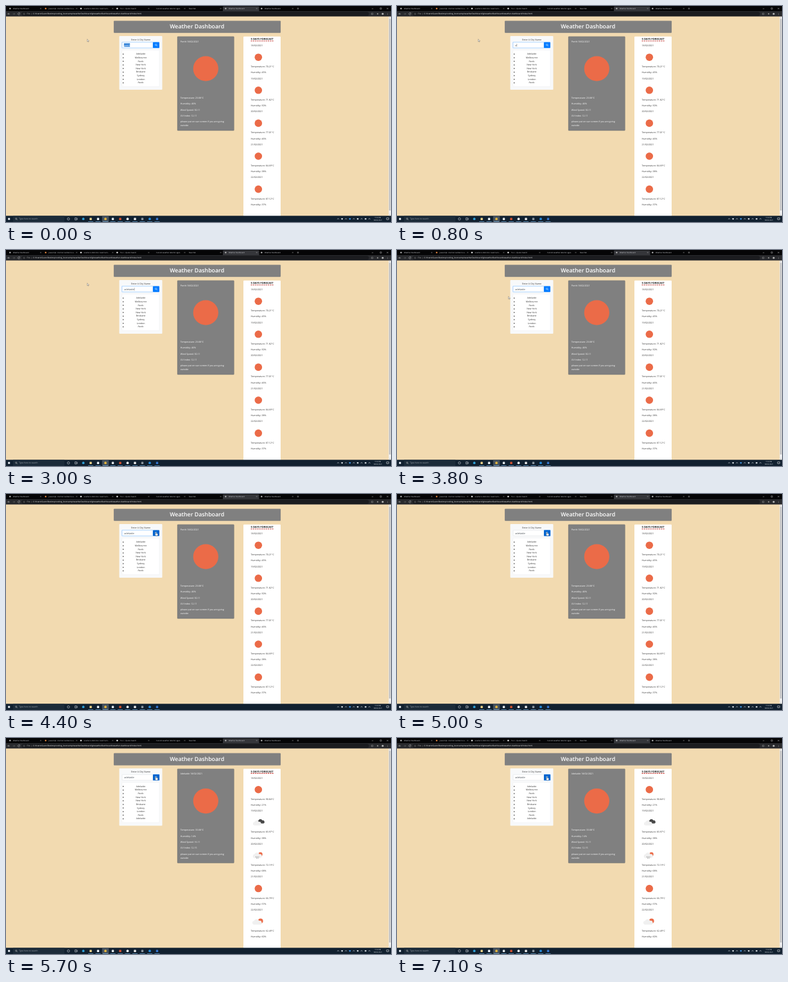
An HTML page that plays this animation: 600 px wide and 338 px high, repeating every 8000 ms.

```html
<!DOCTYPE html>
<html lang="en">
<head>
<meta charset="utf-8">
<title>Weather Dashboard</title>
<style>
html, body { margin: 0; width: 100%; height: 100%; overflow: hidden; background: #f2dab0; }
svg { display: block; width: 600px; height: 338px; }
text { font-family: "Open Sans", "Noto Sans", sans-serif; text-rendering: geometricPrecision; white-space: pre; }
</style>
</head>
<body>
<svg viewBox="0 0 600 338"><g id="page"></g><g id="frame"></g><g id="pointer"></g></svg>
<script>
const LOOP = 8000, ORANGE = '#eb6b48', REM = 3.75;
const range = n => [...Array(n).keys()];

// y is the vertical middle of the text
const text = (x, y, s, fill = '#333', size = 3.57, extra = '') =>
  `<text x="${x}" y="${y + size * .36}" font-size="${size}" fill="${fill}" ${extra}>${s}</text>`;
const mid = (x, y, s, fill, size, extra = '') => text(x, y, s, fill, size, 'text-anchor="middle" ' + extra);
const rect = (x, y, w, h, fill, rx = 0, extra = '') =>
  `<rect x="${x}" y="${y}" width="${w}" height="${h}" fill="${fill}" rx="${rx}" ${extra}/>`;
const dot = (x, y, r, fill) => `<circle cx="${x}" cy="${y}" r="${r}" fill="${fill}"/>`;
const line = (d, stroke, w = .5, extra = '') =>
  `<path d="${d}" fill="none" stroke="${stroke}" stroke-width="${w}" ${extra}/>`;
const lens = (x, y, r, stroke) =>
  line(`M${x - r} ${y}a${r} ${r} 0 1 1 ${2 * r} 0a${r} ${r} 0 1 1 ${-2 * r} 0M${x + r * .7} ${y + r * .7}l1.2 1.2`, stroke);
const cloud = (x, y, k, fill) =>
  `<path transform="translate(${x} ${y}) scale(${k})" fill="${fill}" d="M-4.5 3a2.6 2.6 0 0 1 .3-5.1a3.8 3.8 0 0 1 7-.3a2.8 2.8 0 0 1 1.5 5.4z"/>`;

const icons = {
  sun: (x, y) => dot(x, y, 5.8, ORANGE),
  clouds: (x, y) => cloud(x + 3.8, y - 1.2, .9, '#484848') + cloud(x - 2, y + 1.3, 1, '#f0f0f0'),
  partly: (x, y) => dot(x + 3.4, y - .8, 3.9, ORANGE) + cloud(x - 2, y + 1.5, 1.15, '#f0f0f0'),
  rain: (x, y) => dot(x + 3.2, y - 2, 3.2, ORANGE) + cloud(x - 1.6, y + .4, 1.1, '#f0f0f0') +
    range(5).map(i => dot(x - 3.8 + i * 1.1, y + 2 + (i % 2) * 2, .55, '#555')).join('')
};

const cities = ['Adelaide', 'Melbourne', 'Perth', 'New York', 'New York', 'Brisbane', 'Sydney', 'London', 'Perth'];
const forecasts = [
  { temp: ['70.21', '71.82', '77.01', '84.69', '87.12'], hum: [45, 50, 46, 38, 37], sky: Array(5).fill('sun') },
  { temp: ['90.84', '83.97', '72.19', '66.79', '62.49'], hum: [21, 38, 68, 57, 60],
    sky: ['sun', 'clouds', 'rain', 'sun', 'partly'] }
];
const keyTimes = [800, 1300, 1500, 1800, 2000, 2300, 2500, 2700];

function searchCard(t, hover) {
  const list = t < 5300 ? cities : [...cities, 'Adelaide'];
  const grow = (list.length - 9) * REM * 1.5;
  const focus = t < 4700;
  const typed = 'adelaide'.slice(0, keyTimes.filter(k => t >= k).length);
  const widths = { a: .556, d: .613, e: .561, l: .253, i: .253 };
  const caret = 184.2 + [...typed].reduce((w, c) => w + widths[c] * 3.9, 0);
  return rect(176.5, 47, 67, 84 + grow, '#f8f9fa', 1) +
    mid(210, 52.5, 'Enter A City Name') +
    (focus ? rect(180.2, 55.9, 49.4, 10.4, '#bfdeff', 1.2) : rect(228.6, 55.9, 11, 10.4, '#a9cffb', 1.2)) +
    rect(181, 56.7, 47.8, 8.8, '#fff', .8, `stroke="${focus ? '#80bdff' : '#ced4da'}" stroke-width=".35"`) +
    (t < 600
      ? rect(183.8, 58.4, 9.4, 5.4, '#2f80d8') + text(184.2, 61.2, 'perth', '#fff', 3.9)
      : text(184.2, 61.2, typed, '#495057', 3.9)) +
    (t >= 600 && t < 3200 ? line(`M${caret + .4} 59v4.6`, '#333', .35) : '') +
    rect(229, 56.5, 10, 9.2, hover ? '#0064cf' : '#007bff', .8) + lens(233.7, 60.8, 1.3, '#fff') +
    rect(180.8, 69, 58.2, 57 + grow, '#fff', .8, 'stroke="#e4e5e6" stroke-width=".3"') +
    list.map((c, i) => {
      const y = 75 + i * REM * 1.5;
      return dot(182.6, y + .3, .75, '#222') + mid(210, y, c);
    }).join('');
}

function todayCard(t) {
  const fresh = t >= 5300, uv = !fresh || t >= 5600;
  const rows = fresh
    ? ['Temperature: 33.88°C', 'Humidity: 14%', 'Wind Speed: 16.11']
    : ['Temperature: 23.88°C', 'Humidity: 46%', 'Wind Speed: 30.11'];
  if (uv) rows.push(`UV Index: ${fresh ? 12.15 : 12.11}`, 'please put on sun screen if you are going');
  return rect(267, 47.7, 88.4, uv ? 147.4 : 123.1, '#808080', 1, 'stroke="#6f6c66" stroke-width=".3"') +
    text(271.8, 55.6, `${fresh ? 'Adelaide' : 'Perth'} 18/02/2021`, '#fff') +
    dot(311.3, 98, 19.6, ORANGE) +
    rows.map((s, i) => text(271.8, 143.5 + i * REM * 2.5, s, '#fff')).join('') +
    (uv ? text(271.8, 186.7, 'outside', '#fff') : '');
}

function forecastCard(t) {
  const f = forecasts[t < 5600 ? 0 : 1];
  return rect(370, 47.7, 58, 290, '#fff', 1) +
    text(381.5, 52, '5 DAYS FORECAST', '#222', 4.08, 'font-weight="700"') +
    line('M381.5 54.8h35.6', '#c23a34', 1.1, 'stroke-dasharray="2.2 1.1"') +
    range(5).map(i => {
      const y = i * 51.6;
      return text(381.5, 61.8 + y, `${18 + i}/02/2021`) + icons[f.sky[i]](393.3, 80.2 + y) +
        text(381.5, 94.9 + y, `Temperature: ${f.temp[i]}°C`) +
        text(381.5, 104.2 + y, `Humidity: ${f.hum[i]}%`);
    }).join('');
}

function pointerAt(t) {
  if (t >= 4400) return [233.8, t < 5600 ? 59.6 : t < 6600 ? 60.2 : t < 7000 ? 60.6 : 60.4];
  const u = Math.min(1, Math.max(0, Math.floor((t - 3400) / 100) / 9));
  const e = u * u * (3 - 2 * u), v = 1 - e;
  const bend = (a, b, c) => v * v * a + 2 * v * e * b + e * e * c;
  return [bend(126.6, 185, 233.8), bend(51.8, 92, 59.6)];
}

function pointer(x, y, hand) {
  const d = hand
    ? 'M-.5 .4q.5-.8 1 0v1.7l2 .5q.5.2.4.9l-.5 2.2h-2.7l-1.7-2.3q.2-.8 1.5 0z'
    : 'M0 0v4l1-.9.6 1.4.6-.3-.6-1.3h1.2z';
  return `<path transform="translate(${x} ${y})" d="${d}" fill="#fff" stroke="#222" stroke-width=".3"/>`;
}

function browserBar() {
  const tabs = [[11, 'Weather Dashboard', '#aaa'], [66.5, 'javascript - Format number to a...', '#d9803c'],
    [121.5, 'ai what is distri do i need num -', '#ddd'], [178, 'f to c - Quolvi Search', '#ddd'],
    [234, 'Current weather data for ageo'], [285, 'New Tab'],
    [347, 'Weather Dashboard', '#aaa'], [403, 'Weather Dashboard', '#aaa']];
  return rect(0, 0, 600, 8.2, '#050506') + rect(338, .8, 56.5, 7.6, '#35363a', 1.2) +
    rect(0, 8, 600, 8.4, '#292a2d') + rect(24.5, 8.9, 541, 6.6, '#1b1c1f', 3.3) +
    tabs.map(([x, s, c], i) => text(x, 4, s, '#dadce0', 2.65) +
      (c ? dot(x - 4.7, 4, 1.25, c) : '') +
      line(`M${53.3 + 56.1 * i} 3.2l1.6 1.6m0-1.6l-1.6 1.6`, '#ccc', .35)).join('') +
    line('M453.5 4h3M455 2.5v3M570 4.2h2.4M583 2.9h2.2v2.2h-2.2zM593.4 2.9l2.3 2.3m0-2.3l-2.3 2.3', '#ddd', .4) +
    line('M6 12.3h-3.2m1.4-1.4l-1.4 1.4 1.4 1.4', '#ddd', .45) +
    line('M10.5 12.3h3.2m-1.4-1.4l1.4 1.4-1.4 1.4', '#777', .45) +
    line('M21.4 11.4a1.6 1.6 0 1 0 .2 1.5M21.6 10.6v1.1h-1.1', '#ddd', .45) +
    line('M27 12.3a1.2 1.2 0 1 1 2.4 0a1.2 1.2 0 1 1-2.4 0M28.2 12v.8M39.8 10.8v3', '#aaa', .3) +
    text(32.5, 12.3, 'File', '#bbb', 3.1) +
    text(42, 12.3, 'C:/Users/Guest/Desktop/coding_bootcamp/weatherDashboard/gitweatherDashboard/weather-dashboard/index.html', '#eee', 3.1) +
    line('M569.5 11.2h2.4v2.2h-2.4z', '#bbb', .4) + dot(579.2, 12.3, 1.1, '#999') +
    dot(587, 12.3, 1.5, '#b8b8b8') + range(3).map(i => dot(594.8, 11.2 + i * 1.1, .32, '#ddd')).join('');
}

function taskbar() {
  const apps = [[120.5, '#2f9fd6'], [132, '#efd58a'], [143.5, '#e8eef2'], [155, '#e5b63c'], [166.5, '#dfe5e8'],
    [178, '#d2512f'], [189.5, '#f2f2f2'], [201, '#e9e9e9'], [212.5, '#89939c'], [224, '#2689d8'], [235.5, '#3474cc']];
  return rect(0, 328.3, 600, 9.7, '#11202f') + rect(11, 328.5, 80, 9.5, '#1c2b39') +
    rect(3.2, 331.7, 3, 3, '#e8eef4') + lens(15.8, 332.9, 1.1, '#ccc') +
    text(20.3, 333.3, 'Type here to search', '#aab1b8', 3.2) +
    line('M95.5 333.2a1.8 1.8 0 1 1 3.6 0a1.8 1.8 0 1 1-3.6 0M107.4 331.6h2.6v3.2h-2.6zM111 331.6v3.2', '#e5e9ec', .55) +
    rect(149.8, 328.4, 10.4, 9.6, '#46525e') +
    apps.map(([x, c], i) => (i % 3 ? rect(x - 1.7, 331.5, 3.4, 3.4, c, .4) : dot(x, 333.2, 1.9, c)) +
      (i > 0 ? rect(x - 4, 337.3, 8, .6, '#76b9ed') : '')).join('') +
    range(9).map(i => i % 2
      ? rect(516.4 + i * 6.1, 332, 2.5, 2.3, i === 3 ? '#3f91dc' : '#ccd2d8', .5)
      : line(`M${516.2 + i * 6.1} 334l1.4-1.8 1.4 1.8`, '#e2e6ea', .5)).join('') +
    mid(579.3, 331.2, '7:19 PM', '#e8ebee', 2.6) + mid(579.3, 335.2, '18/02/2021', '#e8ebee', 2.6) +
    line('M593 331.6h3.6v2.6h-1.5l-.8.8v-.8h-1.3z', '#fff', .5);
}

function scrollbar() {
  return rect(596.4, 16.4, 3.6, 312, '#f1f1f1') + rect(596.9, 20, 2.6, 300, '#c4c4c4') +
    line('M597.4 18.7l.8-.8.8.8M597.4 325.8l.8.8.8-.8', '#666', .4);
}

const page = document.getElementById('page');
const pointerLayer = document.getElementById('pointer');
document.getElementById('frame').innerHTML = scrollbar() + browserBar() + taskbar();

let shown = '';
function draw() {
  const t = performance.now() % LOOP;
  const [x, y] = pointerAt(t);
  const hover = x > 229;
  const markup = `<g transform="translate(0 ${t < 5600 ? 0 : .55})">` +
    rect(168, 23.3, 260, 18.8, '#808080', 1, 'stroke="#96938d" stroke-width=".3"') +
    mid(297.7, 32.2, 'Weather Dashboard', '#fff', 8.8, 'font-weight="600"') +
    searchCard(t, hover) + todayCard(t) + forecastCard(t) + '</g>';
  if (markup !== shown) page.innerHTML = shown = markup;
  pointerLayer.innerHTML = pointer(x, y, hover);
  requestAnimationFrame(draw);
}
draw();
</script>
</body>
</html>
```
